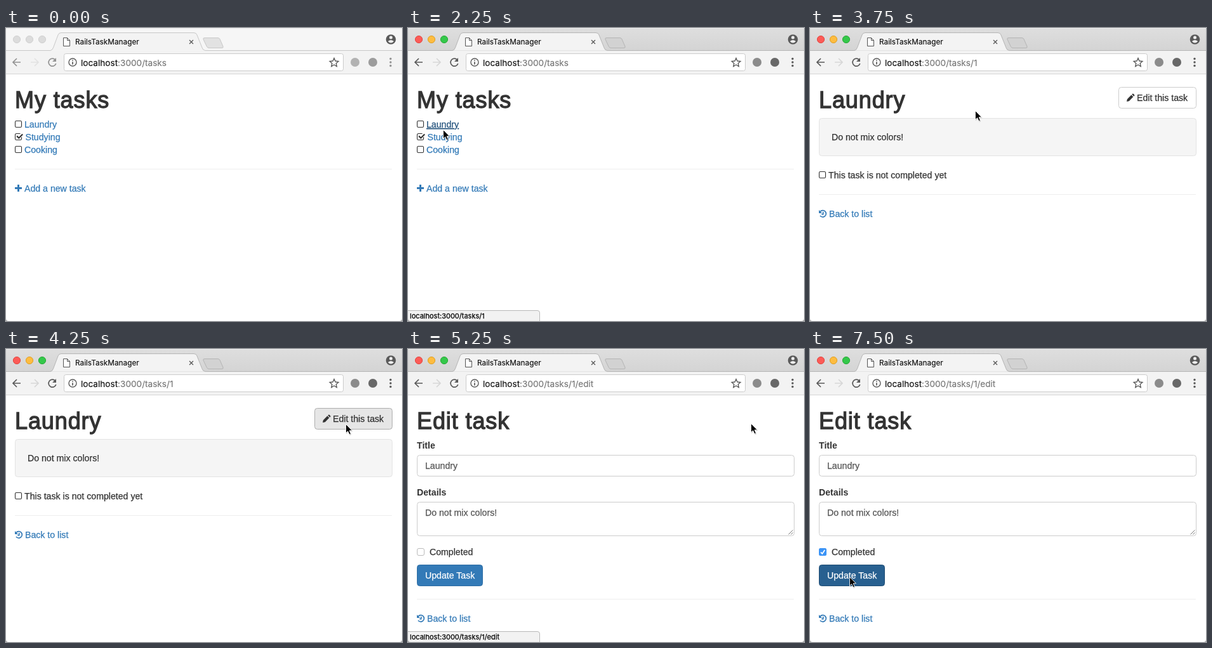
An HTML page that plays this animation: 624 px wide and 462 px high, repeating every 8000 ms.

```html
<!DOCTYPE html>
<html lang="en">
<head>
<meta charset="utf-8">
<title>Task manager</title>
<style>
  html, body { margin: 0; width: 100%; height: 100%; overflow: hidden; background: #fff; }
  svg { display: block; width: 624px; height: 462px; }
  text {
    font: 14.15px "Liberation Sans", Arial, sans-serif;
    fill: #333; stroke: #333; stroke-width: .25px; white-space: pre;
  }
  .ui { font: 13.6px Inter, sans-serif; fill: #111; stroke: #111; stroke-width: .15px; }
  .tab { font-size: 11.8px; }
  .tip { font-size: 11px; fill: #000; stroke: #000; stroke-width: .25px; }
  .path { fill: #777; stroke: #777; }
  .h1 { font-size: 36px; letter-spacing: .9px; stroke-width: 1.3px; }
  .bold { font-weight: bold; stroke: none; }
  .link { fill: #337ab7; stroke: #337ab7; }
  .field { fill: #555; stroke: #555; }
  .onDark { fill: #fff; stroke: #fff; }
  .line { fill: none; stroke: #333; stroke-width: 1.1; }
  .rule { stroke: #eee; }
  .box { fill: #fff; stroke: #ccc; }
  .icon { fill: none; stroke: #5a5a5a; stroke-width: 1.7; }
  .thin { stroke-width: 1.4; }
  .solid { fill: #5a5a5a; }
  .chromeBg { fill: url(#bar); }
  .edge { stroke: #b5b5b5; }
  .newTab { fill: #d2d2d2; }
  .light1 { fill: #fc5b57; stroke: #e2463f; }
  .light2 { fill: #fdbc40; stroke: #dfa023; }
  .light3 { fill: #34c84a; stroke: #27aa35; }
  .inactive .chromeBg { fill: #f6f6f6; }
  .inactive .edge { stroke: #c8c8c8; }
  .inactive .newTab { fill: #e2e2e2; }
  .inactive .lights circle { fill: #dcdcdc; stroke: #d0d0d0; }
  .inactive .tools { opacity: .62; }
  .hover .link { fill: #23527c; stroke: #23527c; text-decoration: underline; }
  .hover .box { fill: #e6e6e6; stroke: #adadad; }
  .primary { fill: #337ab7; stroke: #2e6da4; }
  .hover .primary { fill: #286090; stroke: #204d74; }
</style>
</head>
<body>
<svg viewBox="0 0 624 462">
  <defs>
    <linearGradient id="bar" x2="0" y2="1">
      <stop stop-color="#dedede"/><stop offset="1" stop-color="#d4d4d4"/>
    </linearGradient>
    <rect id="square" x=".5" y="-10.5" width="10" height="10" rx="1.8" class="line"/>
    <g id="back">
      <path d="M2.2-8.6A5.2 5.2 0 1 1 2-2M6.7-8v3.6H4.2" fill="none" stroke="#337ab7" stroke-width="1.7"/>
      <path d="M0-11v5h5z" fill="#337ab7"/>
      <text x="16" class="link">Back to list</text>
    </g>
  </defs>
  <rect width="624" height="462" fill="#fff"/>

  <g id="window">
    <rect class="chromeBg" width="624" height="36"/>
    <path d="M0 .5H624" stroke="#eee"/>
    <rect y="36" width="624" height="36" fill="#f3f3f3"/>
    <path d="M0 72.5H624" stroke="#d6d6d6"/>
    <path d="M0 35.5H70Q73 35 74.5 31L82 11Q83 7.5 87 7.5H296Q300 7.5 301 11L309 31Q310 35 314 35.5H624" fill="#f3f3f3" class="edge"/>
    <path d="M313 15.5H334Q336 15.5 337 17.5L342 29Q343 31.5 340 31.5H320Q317.5 31.5 316.5 29.5L311 18Q310 15.5 313 15.5Z" class="newTab edge"/>
    <g class="lights">
      <circle class="light1" cx="17" cy="18" r="5.6"/>
      <circle class="light2" cx="37" cy="18" r="5.6"/>
      <circle class="light3" cx="57" cy="18" r="5.6"/>
    </g>
    <path d="M90.5 15.5H96.5L100.5 19.5V28.5H90.5ZM96.5 15.5V19.5H100.5" fill="#fff" stroke="#555"/>
    <text x="109" y="26" class="ui tab">RailsTaskManager</text>
    <path d="M289 19l6 6m0-6l-6 6" class="icon thin"/>
    <circle cx="606.5" cy="18" r="7.8" class="solid"/>
    <circle cx="606.5" cy="15" r="2.5" fill="#eee"/>
    <path d="M601.8 21Q606.5 17 611.2 21Q606.5 26 601.8 21" fill="#eee"/>
    <g class="tools">
      <path d="M23 54H11M17 48L11 54L17 60" class="icon"/>
      <path d="M39 54H51M45 48L51 54L45 60" class="icon" opacity=".18"/>
      <path d="M77.5 50A6 6 0 1 0 78.8 56" class="icon"/>
      <path d="M79 47V53H73Z" class="solid"/>
      <circle cx="550" cy="54" r="7" fill="#8b8b8b"/>
      <circle cx="578" cy="54" r="7" fill="#686868"/>
      <g class="solid">
        <circle cx="606" cy="48.5" r="1.7"/><circle cx="606" cy="54" r="1.7"/><circle cx="606" cy="59.5" r="1.7"/>
      </g>
    </g>
    <rect x="91.5" y="40.5" width="440" height="27" rx="3" fill="#fff" stroke="#cbcbcb"/>
    <circle cx="105" cy="54" r="6" class="icon thin"/>
    <path d="M105 50.2v1.6m0 1.4v4.3" class="icon"/>
    <path d="M517 47.5l2 4.5 4.8.5-3.6 3.2 1 4.8-4.2-2.5-4.2 2.5 1-4.8-3.6-3.2 4.8-.5Z" class="icon thin"/>
    <text x="118" y="59.5" class="ui">localhost<tspan class="path" id="url"></tspan></text>
  </g>

  <g id="list">
    <text x="14" y="126" class="h1">My tasks</text>
    <use href="#square" x="14" y="157"/>
    <g id="laundry"><text x="29" y="157" class="link">Laundry</text></g>
    <path d="M24.5 172V174.7Q24.5 176.5 22.5 176.5H16.5Q14.5 176.5 14.5 174.7V168.5Q14.5 166.5 16.5 166.5H22.5" class="line"/>
    <path d="M17 170.3l3.2 3.2 6-6" fill="none" stroke="#333" stroke-width="2.1"/>
    <text x="30.5" y="177" class="link">Studying</text>
    <use href="#square" x="14" y="197"/>
    <text x="29" y="197" class="link">Cooking</text>
    <path d="M14 222.5H608" class="rule"/>
    <path d="M19.5 247v11M14 252.5h11" stroke="#337ab7" stroke-width="3"/>
    <text x="29" y="258" class="link">Add a new task</text>
  </g>

  <g id="show">
    <text x="14" y="126" class="h1">Laundry</text>
    <g id="edit">
      <rect x="486.5" y="93.5" width="122" height="33" rx="4" class="box"/>
      <path d="M499 116l.8-3.8 6.6-6.6 3 3-6.6 6.6ZM507.2 104.8l1-1q.7-.6 1.4 0l1.6 1.6q.6.7 0 1.4l-1 1Z" fill="#333"/>
      <text x="515" y="115">Edit this task</text>
    </g>
    <rect x="14.5" y="142.5" width="594" height="59" rx="4" fill="#f5f5f5" stroke="#e3e3e3"/>
    <text x="34" y="177">Do not mix colors!</text>
    <use href="#square" x="14" y="237"/>
    <text x="29" y="237">This task is not completed yet</text>
    <path d="M14 262.5H608" class="rule"/>
    <use href="#back" x="14" y="298"/>
  </g>

  <g id="form">
    <text x="14" y="126" class="h1">Edit task</text>
    <text x="14" y="157" class="bold">Title</text>
    <rect x="14.5" y="167.5" width="594" height="33" rx="4" class="box"/>
    <text x="27" y="189" class="field">Laundry</text>
    <text x="14" y="231" class="bold">Details</text>
    <rect x="14.5" y="241.5" width="594" height="53" rx="4" class="box"/>
    <text x="27" y="263" class="field">Do not mix colors!</text>
    <path d="M599.5 292.5l7-7m-3 7l3-3" stroke="#777"/>
    <rect x="14.5" y="314.5" width="11" height="11" rx="2.5" fill="#fff" stroke="#bbb"/>
    <g id="checked">
      <rect x="14" y="314" width="12" height="12" rx="2.5" fill="#3b94f7"/>
      <path d="M17 320.3l2.3 2.5 4-5.8" fill="none" stroke="#fff" stroke-width="1.7"/>
    </g>
    <text x="34" y="325">Completed</text>
    <g id="update">
      <rect x="14.5" y="340.5" width="103" height="33" rx="4" class="primary"/>
      <text x="27" y="362" class="onDark">Update Task</text>
    </g>
    <path d="M14 394.5H608" class="rule"/>
    <use href="#back" x="14" y="430"/>
  </g>

  <g id="status">
    <path d="M-1 445.5H204Q207.5 445.5 207.5 449V463H-1Z" fill="#f2f2f2" stroke="#b8b8b8"/>
    <text x="3" y="458" class="ui tip" id="statusText"></text>
  </g>
  <path d="M0 458Q0 462 4 462H0ZM624 458Q624 462 620 462H624Z" fill="#aaa"/>
  <g id="cursor">
    <path d="M1 2V16L4.3 13L6.6 18.3L9.2 17.2L7 12H11.5Z" opacity=".2"/>
    <path d="M.5.5V14.5L3.7 11.6L6 16.8L8.4 15.8L6.2 10.7H10.5Z" stroke="#fff" stroke-width=".9"/>
  </g>
</svg>
<script>
const LOOP = 8000;
const $ = id => document.getElementById(id);
const show = (id, on) => $(id).style.display = on ? "" : "none";

// [time, x, y]: the pointer is sampled in hard steps
const pointer = [
  [250, 400, 430], [500, 220, 300], [750, 130, 228], [1000, 127, 222],
  [1250, 112, 205], [1500, 75, 178], [1750, 57, 162], [2000, 55, 160],
  [3750, 260, 130], [4000, 450, 119], [4250, 535, 118], [4500, 540, 117],
  [5750, 480, 155], [6000, 260, 255], [6250, 80, 312], [6500, 20, 319],
  [7000, 30, 332], [7250, 56, 353], [7500, 62, 359]
];

function render(t) {
  const within = (from, to) => t >= from && t < to;
  const page = t < 3000 ? "list" : t < 5000 ? "show" : "form";
  for (const id of ["list", "show", "form"]) show(id, id === page);

  $("window").classList.toggle("inactive", t < 750);
  $("url").textContent = ":3000/tasks" + { list: "", show: "/1", form: "/1/edit" }[page];
  $("laundry").classList.toggle("hover", t >= 1750);
  $("edit").classList.toggle("hover", t >= 4250);
  $("update").classList.toggle("hover", t >= 7250);
  show("checked", t >= 6750);

  show("status", within(2000, 3250) || within(4500, 5750));
  $("statusText").textContent = "localhost:3000/tasks/1" + (t < 4500 ? "" : "/edit");

  const spot = pointer.findLast(([time]) => time <= t);
  show("cursor", spot);
  if (spot) $("cursor").setAttribute("transform", `translate(${spot[1]} ${spot[2]})`);
}

const start = performance.now();
function tick() {
  render((performance.now() - start) % LOOP);
  requestAnimationFrame(tick);
}
tick();
</script>
</body>
</html>
```
